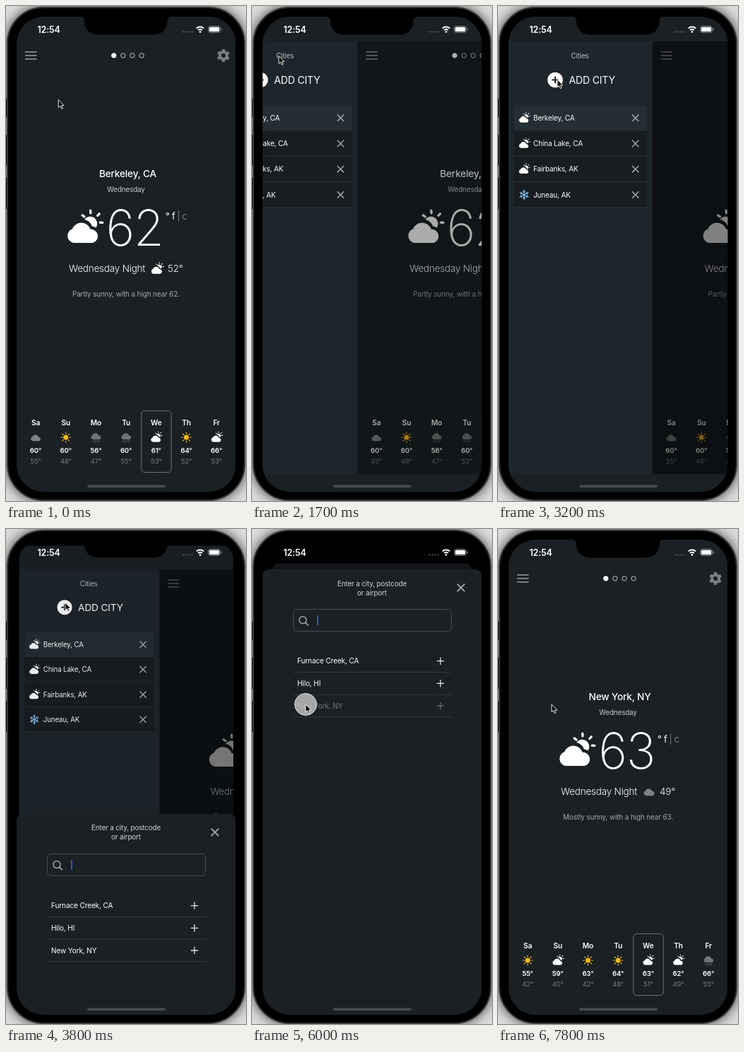
An HTML page that plays this animation: 340 by 700 pixels, repeating every 8 s.

```html
<!DOCTYPE html>
<html lang="en">
<head>
<meta charset="utf-8">
<title>Weather app</title>
<style>
html, body { margin: 0; width: 100%; height: 100%; overflow: hidden; background: #777; }
svg { display: block; width: 340px; height: 700px; }
text { font-family: Inter, Roboto, sans-serif; letter-spacing: -.015em; white-space: pre; }
</style>
</head>
<body>
<svg id="stage" viewBox="0 0 340 700"></svg>
<script>
const LOOP = 8000, STEP = 100, DRAWER = 203.5;
const BG = '#1a2024', PANEL = '#1d262c';

// ---------- markup helpers ----------
const text = (x, y, str, size, { fill = '#fff', weight = 400, anchor = 'start', extra = '' } = {}) =>
  `<text x="${x}" y="${y + size * .36}" font-size="${size}" font-weight="${weight}" fill="${fill}" text-anchor="${anchor}" ${extra}>${str}</text>`;
const centered = (x, y, str, size, fill = '#fff', weight = 400) =>
  text(x, y, str, size, { fill, weight, anchor: 'middle' });
const rect = (x, y, w, h, fill, extra = '') =>
  `<rect x="${x}" y="${y}" width="${w}" height="${h}" fill="${fill}" ${extra}/>`;
const line = (d, stroke, width, extra = '') =>
  `<path d="${d}" fill="none" stroke="${stroke}" stroke-width="${width}" ${extra}/>`;
const cross = (x, y, r, stroke, width) =>
  line(`M${x - r} ${y - r}l${2 * r} ${2 * r}m0 ${-2 * r}l${-2 * r} ${2 * r}`, stroke, width);
const plus = (x, y, r, stroke, width) =>
  line(`M${x - r} ${y}h${2 * r}M${x} ${y - r}v${2 * r}`, stroke, width);

// Spokes around a point, angles in degrees
const rays = (cx, cy, inner, outer, angles) => angles.map(a => {
  const c = Math.cos(a * Math.PI / 180), s = Math.sin(a * Math.PI / 180);
  return `M${cx + inner * c} ${cy + inner * s}L${cx + outer * c} ${cy + outer * s}`;
}).join('');
const around = n => Array.from({ length: n }, (_, i) => i * 360 / n);

// ---------- weather icons, drawn in a 51 unit box ----------
const CLOUD = 'M10.5 46A10.300 10.300 0 0 1 9 26.200A13.800 13.800 0 0 1 34.800 26.800A9.800 9.800 0 0 1 38 46Z';
const shapes = {
  partly: `<path d="${CLOUD}" fill="#fff"/>
    <path d="M26 13A10 10 0 1 1 42.5 24.500C40.500 23.200 38.500 22.800 37 22.500C35 17.500 31.500 14 26 13Z" fill="#fff"/>` +
    line(rays(36, 16, 12.3, 15.8, [-145, -95, -45, 5]), '#fff', 3.3, 'stroke-linecap="round"'),
  cloud: `<path d="${CLOUD}" transform="translate(2 -4)" fill="#808080"/>`,
  rain: `<path d="${CLOUD}" transform="translate(2 -11)" fill="#707274"/>` +
    line('M14 39l-3 6M24 39l-5 10M33 39l-3 6M41 39l-4 8', '#707274', 3, 'stroke-linecap="round"'),
  sun: '<circle cx="25.5" cy="25.5" r="11" fill="#f6b91f"/>' +
    line(rays(25.5, 25.5, 15.5, 21.5, around(8)), '#f6b91f', 3.6, 'stroke-linecap="round"'),
  snow: line(rays(25.5, 25.5, 0, 22, around(6).map(a => a + 30)), '#8cc0ee', 3.8, 'stroke-linecap="round"') +
    around(6).map(a => line('M42 19.5l-5 6l5 6', '#8cc0ee', 3.4,
      `transform="rotate(${a + 30} 25.5 25.5)"`)).join('')
};
const icon = (kind, x, y, scale) =>
  `<g transform="translate(${x} ${y}) scale(${scale}) translate(-25.5 -25.5)">${shapes[kind]}</g>`;

// ---------- main page ----------
const DAYS = ['Sa', 'Su', 'Mo', 'Tu', 'We', 'Th', 'Fr'];
const berkeley = {
  id: 'berkeley', city: 'Berkeley, CA', now: 62, night: ['partly', 52],
  note: 'Partly sunny, with a high near 62.',
  icons: ['cloud', 'sun', 'rain', 'rain', 'partly', 'sun', 'partly'],
  high: [60, 60, 56, 60, 61, 64, 66], low: [55, 48, 47, 55, 53, 52, 53]
};
const newYork = {
  id: 'newYork', city: 'New York, NY', now: 63, night: ['cloud', 49],
  note: 'Mostly sunny, with a high near 63.',
  icons: ['sun', 'partly', 'sun', 'sun', 'partly', 'partly', 'rain'],
  high: [55, 59, 63, 64, 63, 62, 66], low: [42, 40, 42, 48, 51, 49, 55]
};

const weather = w => `<g id="${w.id}">` +
  centered(172.5, 237, w.city, 13.7, '#fff', 500) +
  text(182, 314, w.now, 70, { weight: 160, anchor: 'middle', extra: 'style="letter-spacing:-.02em"' }) +
  icon(w.night[0], 214, 371.5, .35) +
  text(229, 371.5, w.night[1] + '°', 13.6, { weight: 300 }) +
  centered(170, 407, w.note, 10, '#a4a7a9') +
  DAYS.map((day, i) => {
    const x = 42 + i * 42.7;
    return centered(x, 589, day, 10.2, '#fff', 600) + icon(w.icons[i], x, 610, .32) +
      centered(x, 628.5, w.high[i] + '°', 9.6, '#fff', 600) +
      centered(x, 643.5, w.low[i] + '°', 9.6, '#74787a');
  }).join('') + '</g>';

const mainPage = () =>
  line('M27 65h16.5M27 70h16.5M27 75h16.5', '#7b7e80', 2) +
  [0, 1, 2, 3].map(i => `<circle cx="${152.8 + i * 13.1}" cy="70" r="3.2" stroke="${i ? '#c4c6c7' : '#fff'}" fill="${i ? 'none' : '#fff'}"/>`).join('') +
  `<g transform="translate(308 70) rotate(74)" fill="none" stroke="#7b7e80">
    <circle r="5" stroke-width="4"/><circle r="7.5" stroke-width="3" stroke-dasharray="4.2 3.654"/></g>` +
  centered(170, 259, 'Wednesday', 9.9, '#c9cbcc') +
  icon('partly', 110.5, 314.5, 1) +
  text(226, 297.5, '°', 13) + text(235, 297.5, 'f', 13) +
  text(242.5, 297.5, '|', 13, { fill: '#777b7d' }) + text(249.5, 297.5, 'c', 13, { fill: '#777b7d' }) +
  text(89, 371.5, 'Wednesday Night', 13.5, { weight: 300 }) +
  rect(191.8, 572.5, 42.4, 87, 'none', 'rx="4.5" stroke="#6c7073"') +
  weather(berkeley) + weather(newYork);

// ---------- drawer and search sheet ----------
const cityRow = (name, kind, i) => {
  const y = 158.3 + i * 36.2;
  return `<g ${i === 4 ? 'id="addedRow"' : ''}>` + rect(23, y - 18, 188, 36.2, '#171d20') +
    `<g id="active${i}">${rect(23, y - 18, 188, 36.2, '#232e35')}</g>` +
    line(`M23 ${y + 18}h188`, '#2d363b', 1) + icon(kind, 37, y, .31) +
    text(50, y, name, 10) + cross(194.7, y, 4.7, '#a0a4a6', 1.5) + '</g>';
};
const CITIES = [['Berkeley, CA', 'partly'], ['China Lake, CA', 'partly'], ['Fairbanks, AK', 'partly'],
  ['Juneau, AK', 'snow'], ['New York, NY', 'partly']];

const drawerPanel = () => rect(15, 50, DRAWER, 612, PANEL) +
  centered(116, 70, 'Cities', 9.9, '#b9bdbf') +
  '<circle cx="81" cy="104.5" r="10.8" fill="#fff"/>' + plus(81, 104.5, 4.7, PANEL, 2) +
  text(100.5, 105, 'ADD CITY', 14.1) +
  CITIES.map(([name, kind], i) => cityRow(name, kind, i)).join('');

const searchSheet = () => rect(15, 57, 310.5, 720, BG, 'rx="9"') +
  centered(170, 77, 'Enter a city, postcode', 9.9, '#d2d4d5') +
  centered(170, 90, 'or airport', 9.9, '#d2d4d5') +
  cross(296, 83, 5.3, '#a4a7a9', 1.9) +
  rect(58.5, 113.5, 224, 31, 'none', 'rx="5" stroke="#474d51"') +
  '<circle cx="72" cy="128.7" r="5" fill="none" stroke="#a4a7a9" stroke-width="1.5"/>' +
  line('M75.6 132.3l4.2 4.2', '#a4a7a9', 1.7) +
  rect(92.2, 122, 1.7, 14, '#3c60dc', 'id="caret"') +
  ['Furnace Creek, CA', 'Hilo, HI', 'New York, NY'].map((name, i) => {
    const y = 186.7 + i * 31.7;
    return `<g id="result${i}">${text(64, y, name, 10.1)}${plus(267, y, 5.2, '#e4e6e7', 1.3)}</g>` +
      line(`M58 ${y + 15.8}h225`, '#32393d', 1);
  }).join('');

// ---------- phone ----------
const statusBar = () =>
  '<path d="M104 14H236Q228.500 15 228.500 22A18 18 0 0 1 210.500 40.500H129A18 18 0 0 1 111 22Q111 15 104 14Z"/>' +
  centered(60.5, 33, '12:54', 12.5, '#fff', 600) +
  [0, 1, 2, 3].map(i => `<circle cx="${251.5 + i * 4}" cy="36.5" r="1.1" fill="#5d6163"/>`).join('') +
  '<circle cx="275" cy="36.6" r="1.4" fill="#fff"/>' +
  line('M272.100 34.200a4.100 4.100 0 0 1 5.800 0M269.700 31.700a7.500 7.500 0 0 1 10.600 0', '#fff', 1.8) +
  rect(286.5, 28.5, 17, 9, 'none', 'rx="2.600" stroke="#8b8e90" stroke-width=".8"') +
  rect(287.8, 29.8, 14.4, 6.4, '#fff', 'rx="1.500"') + rect(304.5, 31.5, 1.2, 3, '#8b8e90', 'rx=".6"') +
  rect(115, 677.3, 111, 3.6, '#48494a', 'rx="1.800"');

document.getElementById('stage').innerHTML = `
  <defs>
    <filter id="soft" x="-20%" width="140%"><feGaussianBlur stdDeviation="9"/></filter>
    <clipPath id="screenClip">${rect(15, 15, 310.5, 672, '#000', 'rx="38"')}</clipPath>
    <clipPath id="pageClip">${rect(15, 15, 310.5, 672, '#000', 'rx="10"')}</clipPath>
  </defs>
  ${rect(0, 0, 340, 700, '#dcdcdc')}
  ${rect(2, 2, 336, 697, '#000', 'rx="51" opacity=".85" filter="url(#soft)"')}
  ${rect(0, 131, 3, 26, '#111')}${rect(0, 182, 3, 44, '#111')}${rect(0, 243, 3, 44, '#111')}
  ${rect(2, 2, 336, 697, '#000', 'rx="51" stroke="#38383a" stroke-width="2"')}
  <g clip-path="url(#screenClip)">
    <g id="page"><g clip-path="url(#pageClip)">
      ${rect(15, 15, 310.5, 672, BG)}
      <g id="main">${mainPage()}${rect(15, 50, 311, 612, '#000', 'id="shade"')}</g>
      <g id="drawer">${drawerPanel()}</g>
      ${rect(15, 15, 310.5, 672, '#000', 'id="pageDim"')}
    </g></g>
    <g id="sheet">${searchSheet()}</g>
  </g>
  ${statusBar()}
  <g id="pointer">
    <circle id="tap" r="15.5" fill="#c6c3c3" fill-opacity=".82" stroke="#dedede"/>
    <path d="M0 0V11L2.500 8.700L4.300 12.600L6 11.900L4.400 8.100H7.700Z" stroke="#fff" stroke-width=".9"/>
  </g>`;

// ---------- motion ----------
const $ = id => document.getElementById(id);
const set = (id, name, value) => $(id).setAttribute(name, value);
const show = (id, on) => { $(id).style.display = on ? '' : 'none'; };
const clamp = v => Math.max(0, Math.min(1, v));
const glide = (t, start) => t > start ? 1 - Math.exp((start - t) / 102) : 0;
const spring = (t, start) => {
  const u = Math.max(0, t - start) * .012;
  return 1 - (1 + u) * Math.exp(-u);
};

const PATH = [[600, 74.3, 132.5], [1100, 38, 70.5], [2200, 38, 70.5], [2400, 84, 104],
  [4600, 84, 104], [5300, 72, 235], [5700, 76, 248]];
function pointerAt(t) {
  const next = PATH.findIndex(p => p[0] > t);
  if (next < 0) return PATH.at(-1).slice(1);
  const b = PATH[next], a = PATH[next - 1] || b;
  const u = clamp((t - a[0]) / (b[0] - a[0] || 1)), e = u * u * (3 - 2 * u);
  return [a[1] + (b[1] - a[1]) * e, a[2] + (b[2] - a[2]) * e];
}
const tapAt = t => Math.max(...[1150, 2500, 6000].map(s => t < s ? 0 : clamp((s + 400 - t) / 200)));

function render(t) {
  const open = glide(t, 1590) - glide(t, 6938);
  const leave = spring(t, 6779);
  const rise = spring(t, 3670) - leave;
  const recede = spring(t, 3720) - leave;
  const added = t >= 6500;

  set('main', 'transform', `translate(${DRAWER * open} 0)`);
  set('shade', 'opacity', open * .5);
  set('drawer', 'transform', `translate(${DRAWER * (open - 1)} 0)`);
  set('page', 'transform', `translate(170 375) scale(${1 - .093 * recede}) translate(-170 -375)`);
  set('pageDim', 'opacity', recede * .3);
  set('sheet', 'transform', `translate(0 ${643 * (1 - rise)})`);

  for (let i = 0; i < 5; i++) show('active' + i, i === (added ? 4 : 0));
  show('addedRow', added);
  show('berkeley', !added);
  show('newYork', added);
  show('caret', t < 4400 || (t < 6300 && (t - 4800) % 1000 < 500 && t >= 4800));
  set('result2', 'opacity', t >= 6000 ? .38 : 1);

  set('pointer', 'transform', `translate(${pointerAt(t).join(' ')})`);
  set('tap', 'opacity', tapAt(t));
}

const began = performance.now();
function tick() {
  const t = (performance.now() - began) % LOOP;
  render(Math.floor(t / STEP) * STEP);
  requestAnimationFrame(tick);
}
tick();
</script>
</body>
</html>
```
